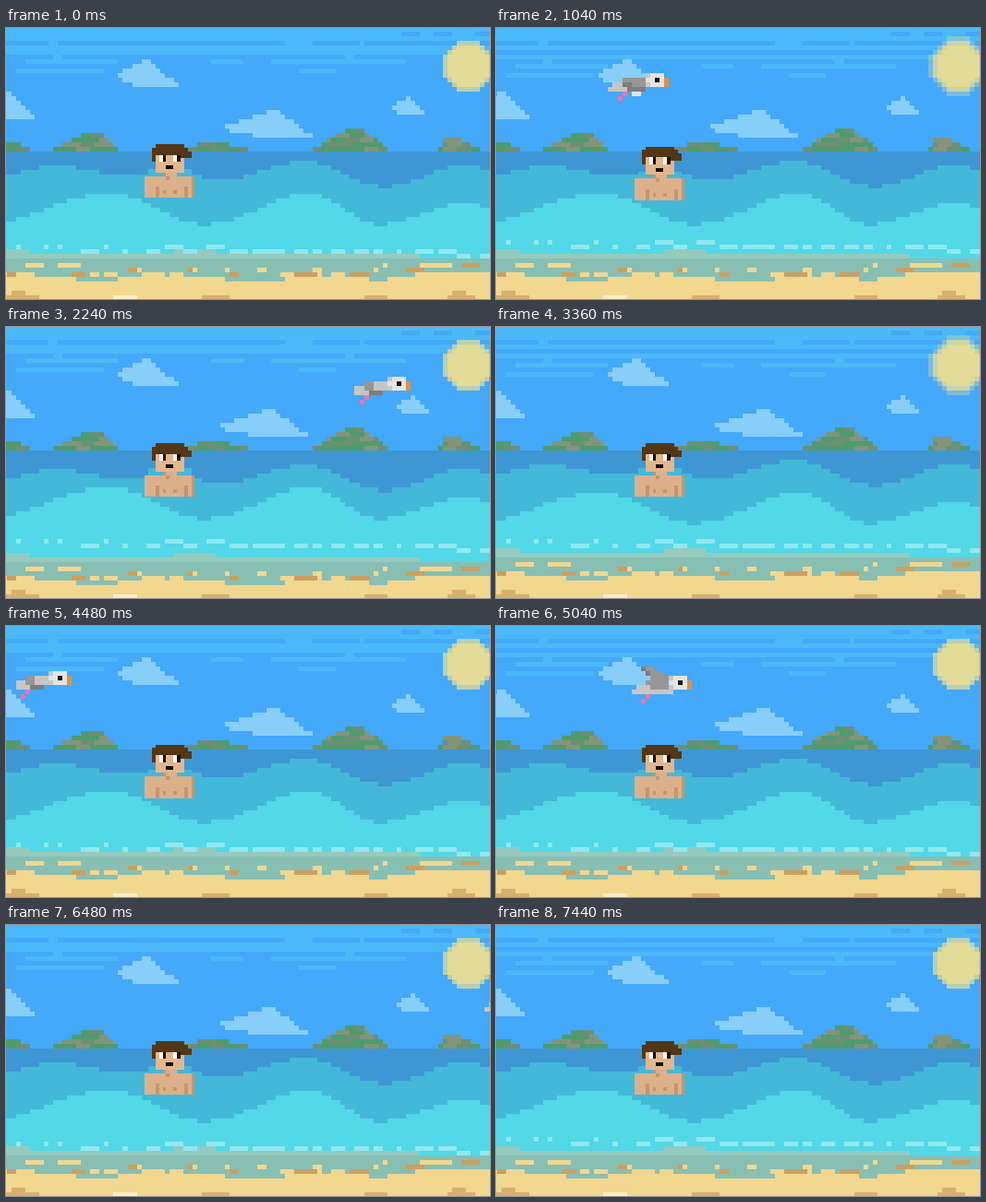
An HTML page with a canvas for the animation above (7520 ms loop, 524x294 px).

```html
<!DOCTYPE html>
<html lang="en">
<head>
<meta charset="utf-8">
<title>Pixel beach</title>
<style>
  html, body { margin: 0; width: 100%; height: 100%; overflow: hidden; background: #44a8fb; }
  canvas { display: block; width: 524px; height: 294px; }
</style>
</head>
<body>
<canvas id="stage" width="524" height="294"></canvas>
<script>
const ctx = document.getElementById('stage').getContext('2d');
const LOOP = 7520, STEP = 80, COLS = 105;
const GRID = { size: 5.02, x: 1, y: 3.8 };

const SKY = '#44a8fb', SKY_LIGHT = '#4bb8f9', CLOUD = '#87cef9';
const DEEP = '#3e97d3', MID = '#44b8d9', LIGHT = '#52d8e6', DASH = '#90e8f0';
const SHORE = '#95cbbf', WET = '#88bfb3', SAND = '#f2d78f', BROWN = '#c9a062';
const ROCK = '#6c8f75', GREEN = '#4f9b6d', OLIVE = '#82957a';

// Fill a block given in cells, with its edges on whole pixels
function block(x, y, w, h, color, grid = GRID) {
  const px = v => Math.round(grid.x + v * grid.size);
  const py = v => Math.round(grid.y + v * grid.size);
  ctx.fillStyle = color;
  ctx.fillRect(px(x), py(y), px(x + w) - px(x), py(y + h) - py(y));
}

function sprite(rows, palette, x, y, grid) {
  rows.forEach((row, j) => [...row].forEach((key, i) => {
    if (palette[key]) block(x + i, y + j, 1, 1, palette[key], grid);
  }));
}

// 1 while the phase lies between from and to, otherwise 0
function pulse(t, period, from, to) {
  const phase = t % period;
  return phase >= from && phase < to ? 1 : 0;
}

const hash = (a, b = 0) => {
  const v = Math.sin(a * 12.9898 + b * 78.233) * 43758.5453;
  return v - Math.floor(v);
};

// Smooth curve through crests and troughs
function curve(points, x) {
  let i = 1;
  while (i < points.length - 1 && points[i][0] < x) i++;
  const [x0, y0] = points[i - 1], [x1, y1] = points[i];
  return y0 + (y1 - y0) * (1 - Math.cos(Math.PI * (x - x0) / (x1 - x0))) / 2;
}

function below(points, color, shift = 0) {
  for (let x = -1; x < COLS; x++) {
    const y = Math.round(curve(points, x)) + shift;
    block(x, y, 1, 60 - y, color);
  }
}

function disc(radius, color) {
  for (let y = -Math.floor(radius); y <= radius; y++) {
    const half = Math.floor(Math.sqrt(radius * radius - y * y));
    block(99 - half, 7 + y, 2 * half + 1, 1, color);
  }
}

function sky(t) {
  const low = pulse(t, 2240, 560, 1680);
  block(-1, -1, 106, 28, SKY);
  block(-1, -1, 106, 6 + low, SKY_LIGHT);
  block(-1, 2, 106, 1, SKY);
  for (const [x, w] of [[9, 2], [60, 6], [76, 1]]) block(x, 2, w, 1, SKY_LIGHT);
  for (const x of [85, 92, 101]) block(x, 0, 4, 1, SKY);
  if (low) block(-1, 4, 106, 1, SKY);

  const dash = (x, y, w) => block(x, y + low, w, 1, SKY_LIGHT);
  for (const x of [10, 73]) dash(x, 5, 2);
  dash(4, 6, 20);
  dash(44, 6, 7);
  dash(57, 6, 29);
  dash(2, 8, 19);
  dash(63, 8, 8);

  if (pulse(t, 2240, 880, 1680)) disc(6.4, 'rgba(226,220,152,.35)');
  disc(5.6, 'rgba(226,220,152,.75)');
  disc(4.9, '#e2dc98');
}

// The right side grows steadily, the left side swells and pulls back
function cloud(peak, top, rows, left, right) {
  for (let i = 0; i < rows; i++) {
    const f = (i + 0.5) / rows;
    const a = Math.round(peak - left * Math.sin(Math.PI * f ** 1.5));
    const b = Math.round(peak + 1 + right * f);
    block(a, top + i, b - a, 1, CLOUD);
  }
}

function clouds(t) {
  const drift = (from, to) => pulse(t, 4480, from, to);
  cloud(29 - 2 * drift(560, 1120), 6, 6, 5, 7.5);
  cloud(57 - drift(600, 2800), 17, 6, 10, 8.5);
  cloud(86 + drift(560, 3920), 14, 4, 3, 3.4);
  cloud(-1 + drift(560, 1680), 13, 6, 2, 6.5);
}

function island(from, peak, to, rows) {
  for (let i = 0; i < rows; i++) {
    const f = ((i + 1) / rows) ** 0.85;
    const a = Math.round(peak - (peak - from) * f), b = Math.round(peak + (to - peak) * f);
    for (let x = a; x < b; x++) {
      const shade = hash(Math.floor((x + i) / 3), i + peak);
      block(x, 26 - rows + i, 1, 1, shade < 0.3 ? GREEN : shade < 0.6 ? OLIVE : ROCK);
    }
  }
}

function islands() {
  island(-4, 0, 5, 2);
  island(10, 19, 24, 4);
  island(38, 44, 52, 2);
  island(66, 75, 82, 5);
  island(93, 95, 102, 3);
}

const midEdge = [[-1, 31], [10, 29], [24, 31], [40, 31], [44, 32.4], [64, 28.2], [81, 33.6], [98, 29], [108, 31]];
const lightEdge = [[-8, 42], [22, 35], [42, 41.6], [65, 35], [80, 41.6], [98, 37], [108, 39]];
const shoreEdge = [[-1, 47], [10, 48], [31, 48], [40, 47], [50, 48], [77, 48.4], [84, 47.6], [92, 49], [105, 49]];
const sandEdge = [[-1, 51.5], [10, 53], [20, 54], [30, 52.4], [42, 53], [54, 54.4], [65, 52.4], [80, 53.6], [92, 52], [105, 52]];

function foam(shift) {
  for (let i = 0; i < 23; i++) {
    const x = Math.round(2 + i * 4.5 + hash(i) * 1.5);
    const y = Math.round(45.4 + x / 50 + hash(i, 3));
    block(x, y + shift, 1 + Math.floor(hash(i, 5) * 4), 1, DASH);
  }
}

// Loose strips of sand on the wet band, some of them dark
function strips(shift) {
  for (let i = 0; i < 26; i++) {
    const x = Math.round(i * 4 + hash(i, 7) * 3);
    const y = 50 + Math.floor(hash(i, 11) * 3);
    const w = 1 + Math.floor(hash(i, 13) * 5);
    block(x, y + shift, w, 1, i % 3 ? SAND : BROWN);
  }
}

function dune(x, w, color = '#d8af70') {
  block(x, 57, w, 1, color);
}

function sea(t) {
  const swell = pulse(t, 3440, 1680, 2800);
  block(-1, 26, 106, 33, DEEP);
  below(midEdge, MID, swell);
  below(lightEdge, LIGHT, -swell);
  below(shoreEdge, SHORE, swell);
  block(-1, 49 + swell, 106, 12, WET);
  below(sandEdge, SAND, swell);
  strips(swell);
  foam(-pulse(t, 6400, 720, 3920));

  dune(-1, 8);
  dune(42, 6);
  dune(77, 5);
  dune(95, 6);
  dune(23, 5, '#fbeec6');
  for (const x of [1, 96]) block(x, 56, 3, 1, '#d8af70');
}

const swimmer = [
  '...HHHHHHHH...',
  '..HHHHHHHHHH..',
  '..HHHHHHHHHHH.',
  '..HFWKFFWKHHH.',
  '..HFWKFFWKF...',
  '...FFFFFFFF...',
  '...FFFKKFFF...',
  '...FFFFFFFF...',
  '.....DSSS.....',
  'SSSSSSDSSSSSSD',
  'SSSSSSSSSSSSSD',
  'SSSSSSSSSSSSSD',
  'SSSDSSSSSSSDSD',
  'SSSDSDSSDSSDSD',
  'SSSDSSSSSSSDSD'
];
const skin = { H: '#533714', F: '#e3b68e', S: '#dcb08b', D: '#c4966f', W: '#ffffff', K: '#15100c' };

function swim(t) {
  const dip = 2.5 * pulse(t, 3680, 560, 2100);
  const grid = { size: 3.87, x: 150.2, y: 126 + dip };
  block(1, 7, 12, 2, MID, grid);
  sprite(swimmer, skin, 0, 0, grid);
}

const body = [
  '........LWWW.',
  '...GGLLLWWKWO',
  '.LLGGLLLLWWWO',
  '.LLLDDD......',
  '...P.........',
  '..P..........'
];
const wings = {
  level: [],
  down: ['', '', '', '...GGGGG', '...DDGGG', 'LLLLDDDD', '.....WW'],
  up: ['..DGG', '...DGGG', '....GGGG', '....GGGG', '...LGGGG', 'LLLLLLLLL']
};
const flap = [wings.level, wings.down, wings.level, wings.up];
const plumage = { W: '#e4e4e4', L: '#c6c6c6', G: '#979797', D: '#7d7d7d', K: '#161616', O: '#e0903f', P: '#f074a8' };

function bird(t) {
  const second = t >= 4000;
  const k = (t - (second ? 4480 : 1040)) / 1200;
  const x = Math.round(second ? 1 + 61 * k : 24 + 50 * k);
  const y = Math.round(second ? 9 + 3 * k : 9 + k);
  sprite(body, plumage, x, y);
  sprite(flap[Math.floor(t / STEP) % 4], plumage, x, y - 2);
}

function draw(t) {
  sky(t);
  clouds(t);
  islands();
  sea(t);
  swim(t);
  bird(t);
}

const start = performance.now();
function tick() {
  const t = (performance.now() - start) % LOOP;
  draw(Math.floor(t / STEP) * STEP);
  requestAnimationFrame(tick);
}
tick();
</script>
</body>
</html>
```
